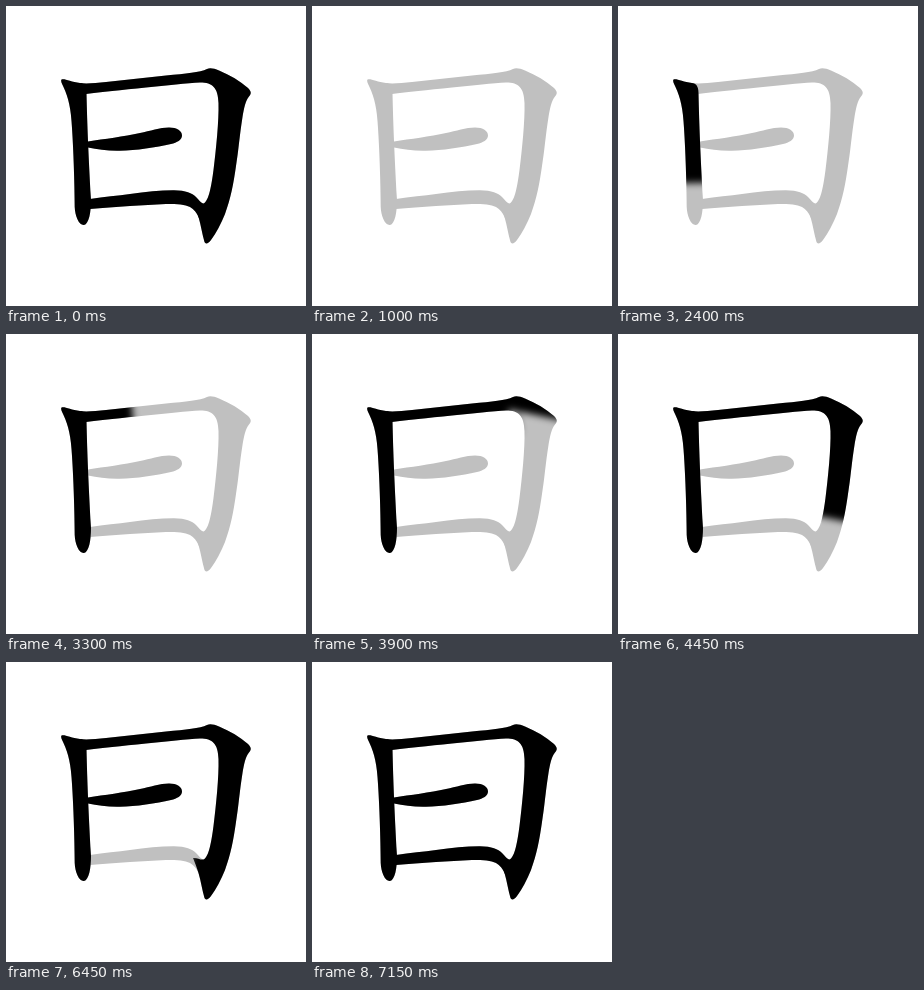
Write an HTML page that moves like this. It is 300x300 px and loops after 8.15 s.

```html
<!DOCTYPE html>
<html lang="zh">
<head>
<meta charset="utf-8">
<title>Stroke order</title>
<style>
html, body { margin: 0; width: 100%; height: 100%; overflow: hidden; background: #fff; }
svg { display: block; width: 100%; height: 100%; }
</style>
</head>
<body>
<svg id="stage" viewBox="0 0 300 300">
  <defs>
    <filter id="soft" filterUnits="userSpaceOnUse" x="0" y="0" width="300" height="300">
      <feGaussianBlur stdDeviation="3.5"/>
    </filter>
  </defs>
</svg>
<script>
const LOOP = 8150, GREY_AT = 1000, HOOK_AT = 4900, DONE_AT = 7150;
const NS = 'http://www.w3.org/2000/svg';
const stage = document.getElementById('stage');

// shape: outline; guide: brush path; runs: [start ms, steps, first length, last length]
const strokes = [
  {
    shape: 'M55.5 73.5C59 72.5 65 76 74 77C78 77.5 80.5 80 80.5 87C81 110 82 140 85 194C85 206 83 218 78 219C73 219.5 69 210 68.7 201C68.5 175 67.5 145 66 122C65 102 62.5 92 57.5 81C55.5 77 54.5 74.5 55.5 73.5Z',
    guide: 'M48 64L66 80Q75 88 75 100L77 235',
    runs: [[1750, 3, 18, 39], [2100, 5, 60, 145], [2600, 1, 180, 180]]
  },
  {
    shape: 'M74 77C80 78 90 77 100 76L160 69.5C180 67.5 194 66.5 201 63C204 61.5 208 62.5 213 64.5C224 69 234 75 242 82C245.5 85.5 245.5 87.5 243 90.5C239.5 95 238 102 236.5 111C233.5 130 232.5 145 230 160C227.5 178 224.5 193 219 208C215 218 210 227 205 234C202.5 237.5 199.5 238.5 198.5 236C196 228 195 219 192.5 211C191 206 189 201 187 196C191 195.5 194 198 197.5 197.5C203 195 205.5 179 207.5 164C210 143 213 115 212.5 97C212 82 207 76.5 194 76.5C182 77 160 79.5 140 81.5C115 84 95 86 80 88Z',
    guide: 'M60 82L205 68C222 68 230 72 226 84C222 96 224 150 219 180L205 250',
    runs: [[3100, 9, 30, 176], [4050, 8, 196, 344]],
    hook: 'M170 180L204 188L197 245L170 245Z'
  },
  {
    shape: 'M82 135.5C98 133 118 130.5 134 127C144 125 154 121.5 163 121.5C171 121.5 176 125 176 129.5C176 134 171 136.5 165 138C150 141.5 130 144.5 114 144.7C102 145 92 143.5 82 141.5Z',
    guide: 'M70 139L195 128',
    runs: [[5400, 1, 20, 20], [5550, 4, 38, 92], [5950, 1, 124, 124]]
  },
  {
    shape: 'M84 193C98 191 112 189.5 124 188C140 186 155 184.2 168 184.3C180 184.5 186 187 190 191C193 194 195 197 199 199L193 212C191 207 188 203.5 184 201C179 198.5 172 198 160 198C148 198.5 136 199.3 124 200C110 201 96 202 84 203Z',
    guide: 'M70 196L215 192',
    runs: [[6450, 7, 6, 105], [7150, 1, 144, 144]]
  }
];

function add(parent, tag, attrs) {
  const el = document.createElementNS(NS, tag);
  for (const key in attrs) el.setAttribute(key, attrs[key]);
  return parent.appendChild(el);
}

for (const s of strokes) add(stage, 'path', { d: s.shape, fill: '#c0c0c0' });

strokes.forEach((s, i) => {
  const mask = add(stage.querySelector('defs'), 'mask', {
    id: 'brush' + i, maskUnits: 'userSpaceOnUse', x: 0, y: 0, width: 300, height: 300
  });
  s.brush = add(mask, 'path', {
    d: s.guide, fill: 'none', stroke: '#fff', 'stroke-width': 60, filter: 'url(#soft)'
  });
  if (s.hook) s.cover = add(mask, 'path', { d: s.hook, fill: '#000' });
  s.ink = add(stage, 'path', { d: s.shape });
});

function drawnLength(runs, t) {
  let len = 0;
  for (const [start, steps, from, to] of runs) {
    if (t < start) break;
    const k = Math.min(steps - 1, Math.floor((t - start) / 100));
    len = steps > 1 ? from + (to - from) * k / (steps - 1) : to;
  }
  return len;
}

function render(t) {
  const whole = t < GREY_AT || t >= DONE_AT;
  strokes.forEach((s, i) => {
    const len = drawnLength(s.runs, t);
    s.ink.setAttribute('mask', whole ? 'none' : `url(#brush${i})`);
    s.ink.setAttribute('visibility', whole || len > 0 ? 'visible' : 'hidden');
    s.brush.setAttribute('stroke-dasharray', `${len} 999`);
    if (s.cover) s.cover.setAttribute('visibility', t < HOOK_AT ? 'visible' : 'hidden');
  });
}

const begin = performance.now();
function tick() {
  render((performance.now() - begin) % LOOP);
  requestAnimationFrame(tick);
}
tick();
</script>
</body>
</html>
```
